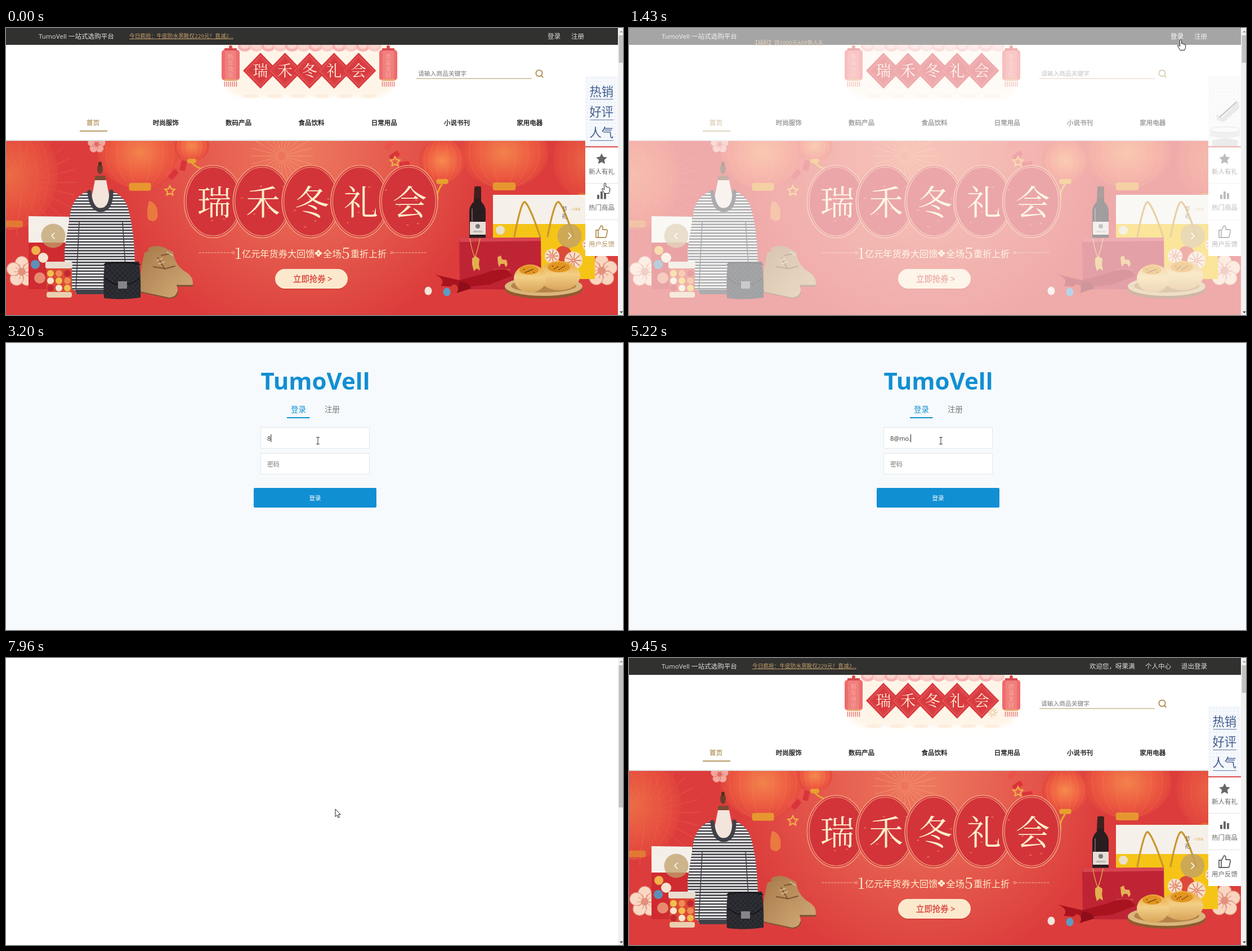
An HTML page that plays this animation: 1096x511 px, repeating every 9.69 s.

```html
<!DOCTYPE html>
<html lang="zh-CN">
<head>
<meta charset="utf-8">
<title>TumoVell</title>
<style>
html, body { margin: 0; width: 100%; height: 100%; overflow: hidden; background: #fff; }
svg { display: block; width: 1096px; height: 511px; }
text { font-family: "Open Sans", "Noto Sans CJK SC", "Noto Sans CJK", sans-serif; white-space: pre; }
.serif { font-family: "Noto Serif CJK SC", "Noto Serif", "Noto Sans CJK SC", serif; }
.mid { text-anchor: middle; }
</style>
</head>
<body>
<svg id="stage" viewBox="0 0 1096 511" xmlns="http://www.w3.org/2000/svg"></svg>
<script>
const LOOP = 9690;
const steps = [0, 250, 680, 910, 1180, 1430, 1680, 1930, 2170, 2430, 2680, 3200, 3700, 4200, 4450,
  5220, 5470, 5720, 5970, 6470, 6720, 6970, 7200, 7440, 7710, 7960, 8220, 8450, 8710, 8960, 9200, 9450];
const gold = '#b4955f';
const EVENT = [...'瑞禾冬礼会'];

// Markup helpers
const many = (n, f) => Array.from({ length: n }, (_, i) => f(i)).join('');
const text = (x, y, s, size, fill, more = '') =>
  `<text x="${x}" y="${y}" font-size="${size}" fill="${fill}" ${more}>${s}</text>`;
const mid = (x, y, s, size, fill, more = '') => text(x, y, s, size, fill, 'class="mid" ' + more);
const rect = (x, y, w, h, fill, more = '') =>
  `<rect x="${x}" y="${y}" width="${w}" height="${h}" fill="${fill}" ${more}/>`;
const oval = (x, y, rx, ry, fill, more = '') =>
  `<ellipse cx="${x}" cy="${y}" rx="${rx}" ry="${ry}" fill="${fill}" ${more}/>`;
const path = (d, fill, more = '') => `<path d="${d}" fill="${fill}" ${more}/>`;
const line = (d, color, w = 1, more = '') =>
  `<path d="${d}" fill="none" stroke="${color}" stroke-width="${w}" stroke-linecap="round" ${more}/>`;
const group = (id, inner, more = '') => `<g id="${id}" ${more}>${inner}</g>`;
const star = (x, y, r, inner) => 'M' + Array.from({ length: 10 }, (_, i) => {
  const a = i * Math.PI / 5 - Math.PI / 2, q = i % 2 ? r * inner : r;
  return (x + q * Math.cos(a)).toFixed(1) + ' ' + (y + q * Math.sin(a)).toFixed(1);
}).join('L') + 'Z';
const rays = (x, y, r0, r1, n, color, w) => many(n, i => {
  const a = i * 2 * Math.PI / n, c = Math.cos(a), s = Math.sin(a);
  return line(`M${x + r0 * c} ${y + r0 * s}L${x + r1 * c} ${y + r1 * s}`, color, w);
});
const flower = (x, y, r, fill, core) => many(5, i => {
  const a = i * 1.2566 - 1.57;
  return oval(x + r * .58 * Math.cos(a), y + r * .58 * Math.sin(a), r * .43, r * .43, fill,
    `stroke="${core}" stroke-width="${r / 22}"`);
}) + oval(x, y, r * .25, r * .25, core) + rays(x, y, r * .2, r * .5, 10, core, r / 25);

const defs = `<defs>
<radialGradient id="glow" gradientUnits="userSpaceOnUse" cx="520" cy="225" r="330">
<stop offset="0" stop-color="#ee7a60"/><stop offset="1" stop-color="#ee7a60" stop-opacity="0"/></radialGradient>
<radialGradient id="lamp"><stop offset="0" stop-color="#f68a4e"/><stop offset=".7" stop-color="#ee5b41"/>
<stop offset="1" stop-color="#e2473d"/></radialGradient>
<linearGradient id="bun" x2="0" y2="1"><stop offset="0" stop-color="#e9a53a"/><stop offset=".45" stop-color="#f3cf86"/>
<stop offset="1" stop-color="#d9a45c"/></linearGradient>
<linearGradient id="boot" x2="1" y2="1"><stop offset="0" stop-color="#a87b4b"/><stop offset="1" stop-color="#cfa673"/></linearGradient>
<pattern id="knit" width="8" height="5.2" patternUnits="userSpaceOnUse">${rect(0, 0, 8, 5.2, '#f2efee')}${rect(0, 0, 8, 2.6, '#45464d')}</pattern>
<pattern id="quilt" width="9" height="9" patternUnits="userSpaceOnUse">${rect(0, 0, 9, 9, '#26272c')}${line('M0 0L9 9M9 0L0 9', '#3d3e45', .8)}</pattern>
<pattern id="dots" x="1029" y="86" width="6.2" height="6.2" patternUnits="userSpaceOnUse">${oval(3, 3, .7, .7, '#cfd9ea')}</pattern>
<filter id="soft" x="-10%" y="-20%" width="120%" height="140%"><feGaussianBlur stdDeviation="4"/></filter>
<clipPath id="hero">${rect(0, 201, 1087, 310, '#000')}</clipPath>
<clipPath id="news">${rect(215, 9, 220, 22, '#000')}</clipPath>
</defs>`;

function logo() {
  const lantern = (x, words) => line(`M${x} -5V39`, '#e88', 1) +
    rect(x - 16, 39, 32, 54, '#ee6c6e', 'rx="5"') + rect(x - 10, 40, 20, 52, '#f07f7d', 'rx="3"') +
    rect(x - 11, 36, 22, 4, '#d9494f', 'rx="1"') + rect(x - 12, 91, 24, 3, '#e9a36c', 'rx="1"') +
    oval(x, 34, 3, 3, '#e0494f') +
    many(7, i => line(`M${x - 10.5 + i * 3.5} 96V104`, '#e8696b', 1.3)) +
    [...words].map((c, i) => mid(x, 55 + i * 11, c, 10.5, '#f6aaa0')).join('');
  const diamond = (c, i) => {
    const x = 452 + i * 43.6;
    return group('dia' + i, path(`M${x} 44L${x + 31} 76L${x} 108L${x - 31} 76Z`, '#d93a40') +
      path(`M${x} 49L${x + 26} 76L${x} 103L${x - 26} 76Z`, 'none', 'stroke="#ee8b83" stroke-width=".8"') +
      path(`M${x} 53L${x + 22} 76L${x} 99L${x - 22} 76Z`, 'none', 'stroke="#e4605f" stroke-width=".7"') +
      `<text x="${x}" y="86" font-size="27" fill="#fff2db" class="mid serif">${c}</text>`);
  };
  return rect(387, 10, 304, 112, '#fef5e8', 'rx="34" filter="url(#soft)"') +
    many(6, i => oval(435 + i * 42, 121, 14, 3.5, '#fdeedd')) +
    many(12, i => oval(424 + i * 21, 33, 12, 9, i % 2 ? '#f9c9c6' : '#f7b1b1') + oval(424 + i * 21, 31, 8, 6, '#fbd5d0')) +
    group('lamps', lantern(399, '新年快乐') + lantern(679, '恭喜发财')) +
    EVENT.map(diamond).join('') +
    group('spark', rays(646, 97, 3, 8, 10, '#e0ad68', 1));
}

function lamps() {
  const lamp = (x, y, rx, ry, a, tab) =>
    `<g opacity="${a}">` + oval(x, y, rx, ry, 'url(#lamp)') +
    [.25, .55, .8].map(k => oval(x, y, rx * k, ry, 'none', 'stroke="#f5945f" stroke-opacity=".35"')).join('') +
    rect(x - rx * .26, y + ry * .84, rx * .52, tab, '#e8a02e', 'rx="4"') + '</g>';
  const cracker = (x, y, dir) => many(7, i =>
    rect(-5, -9, 10, 18, i % 2 ? '#d9343a' : '#ea5347',
      `rx="2" transform="translate(${x + dir * i * 9} ${y - i * 8 + (i % 2) * 11}) rotate(${dir * 55 - i * 14})"`));
  return rays(30, 275, 25, 95, 26, 'rgba(246,130,100,.35)', 1) + rays(490, 228, 8, 55, 24, 'rgba(250,190,130,.45)', 1) +
    lamp(8, 262, 84, 96, .6, 12) + lamp(238, 222, 75, 64, .9, 14) + lamp(885, 222, 78, 63, .9, 14) +
    lamp(1032, 235, 60, 70, .5, 12) +
    cracker(288, 258, 1) + cracker(735, 256, -1) +
    lamp(330, 210, 31, 27, 1, 8) + lamp(775, 236, 41, 39, 1, 9) +
    line('M330 240Q342 252 352 250M774 279Q766 290 764 305', '#e6a630', 3) +
    path('M254 308Q272 312 269 338Q262 349 252 340Q249 325 254 308Z', '#ea7a40') +
    path('M759 286Q770 289 768 306Q762 314 758 306Z', '#e6a51e') +
    [[291, 290], [691, 238]].map(([x, y]) => path(star(x, y, 9, .5), 'none', 'stroke="#f2b04a" stroke-width="2.2"')).join('') +
    flower(161, 207, 16, '#f3a9a0', '#e06d63');
}

function goodsLeft() {
  return flower(28, 434, 27, '#f9d9c4', '#e2917c') +
    path('M40 335L112 336V465H40Z', '#f4efe9') + path('M40 382H112V465H40Z', '#cf2b31') +
    oval(53, 396, 8, 8, '#f0b24a') + oval(66, 409, 9, 9, '#f6e3d0') + oval(52, 421, 8, 8, '#5d90b8') + oval(60, 445, 10, 10, '#e88a70') +
    oval(167, 251, 5, 9, '#6b3d2a') + rect(164, 238, 6, 8, '#52301f', 'rx="3"') + rect(158, 263, 19, 10, '#7d4a32', 'rx="3"') +
    path('M158 271H178L182 292Q190 318 168 324Q146 318 154 292Z', '#f3e4dc') +
    path('M148 290Q122 297 115 325L104 395L105 455Q107 466 122 466L125 473H212L216 440L229 424Q228 360 217 322Q211 299 186 289Q186 324 168 324Q152 322 148 290Z', 'url(#knit)') +
    line('M148 292Q151 324 168 324Q187 324 187 291', '#404148', 7) +
    line('M130 345L124 470M207 345L213 440', '#3c3d44', 1.5) + rect(125, 466, 50, 8, '#404148') +
    path('M252 392Q266 385 279 390L297 399Q300 424 322 436Q335 446 331 459H296Q270 445 260 428Z', 'url(#boot)') +
    line('M296 459H331', '#7b5532', 3) +
    path('M246 400Q262 392 276 403L281 428Q302 446 305 466Q305 479 290 481L238 470Q235 446 246 400Z', 'url(#boot)') +
    line('M239 470L290 481Q303 480 305 470M270 409L282 429M276 405L290 402M262 425L280 428M281 429L300 424', '#7b5532', 2) +
    line('M268 414L278 410M271 420L282 416M286 399L296 405', '#f0dab8', 1.2) +
    path('M176 416H236Q240 440 239 480Q206 485 174 481Q172 440 176 416Z', 'url(#quilt)') +
    line('M174 421Q206 414 238 421M176 446Q206 470 237 446', '#0f1013', 1.5) + rect(199, 451, 16, 13, '#85858a') +
    rect(72, 424, 45, 56, '#dc4a35', 'rx="7"') + rect(70, 416, 48, 12, '#e9ddd0', 'rx="3"') + rect(72, 470, 45, 10, '#ead0b0', 'rx="4"') +
    many(9, i => oval(79 + i % 3 * 15, 437 + (i / 3 | 0) * 13, 6, 6, ['#f0c04e', '#f8e5cf', '#c22832', '#f08a54'][i * 3 % 4]));
}

function goodsRight() {
  const blossom = (x, y, r) => oval(x, y, r, r, '#f4dfc8') + rays(x, y, 2, r - 2, 9, '#df6a50', 1.3);
  return flower(1058, 432, 28, '#f9d6c0', '#e2917c') +
    path('M865 297H1046V447H865Z', '#f5f1ea') + path('M865 349H1046V447H865Z', '#f5c417') +
    line('M903 371Q916 305 922 310Q931 318 949 372M962 371Q975 305 982 310Q991 318 1008 372', '#c9962f', 3.2) +
    oval(990, 402, 14, 14, '#dd4a3a') + blossom(970, 406, 13) + blossom(1008, 414, 16) + oval(993, 425, 9, 9, '#6a9ab0') +
    blossom(1036, 386, 12) + oval(878, 360, 8, 8, '#e8e1c8') +
    text(987, 326, '节', 10, '#4a3a32', 'class="serif"') + text(987, 339, '礼', 10, '#4a3a32', 'class="serif"') +
    text(1002, 324, '八方新禧', 4.5, '#d9a24a') +
    path('M832 284Q838 279 844 284V309Q852 317 852 326V377H823V326Q823 317 831 309Z', '#2a1d20') +
    rect(832, 282, 12, 22, '#40201f', 'rx="2"') + line('M828 322V344', '#6f595b', 2) + rect(824, 345, 28, 23, '#e5ddd6') +
    oval(838, 353, 4, 4, '#777') + text(830, 364, 'VINO ROSSO', 2.8, '#555') +
    path('M805 374L950 373L951 466L806 465Z', '#bf2435') + path('M805 374L950 373V379L806 381Z', '#d84550') +
    line('M824 375Q827 395 833 409Q838 395 842 375', '#ddb04f', 1.3) +
    path('M828 410L834 406L841 411L840 421L842 432L836 428L831 433L828 421Z', '#e3b14e') +
    path('M873 408L879 405L881 412L889 413L891 421L888 426L885 420L879 420L876 426L874 419Z', '#e5ae55') +
    mid(881, 432, 'GOOD DAY GIFT', 4, '#e5ae55') +
    path('M762 439L805 449L850 437Q872 427 890 431L900 441L858 457L806 462L772 459Q782 448 762 439Z', '#a9131f') +
    path('M806 451Q824 453 826 464L800 472Z', '#8d0e19') +
    oval(750, 468, 6.5, 7.5, '#f2e6d8') + oval(783, 470, 6.5, 7.5, '#5b9cc4') + oval(796, 465, 7, 8.5, '#d63a35') +
    oval(955, 466, 69, 16, '#8f5b2f') + oval(955, 460, 69, 17, '#d9b67c') + oval(955, 459, 58, 12, '#b58448') +
    oval(983, 441, 37, 26, 'url(#bun)') + oval(931, 446, 29, 25, 'url(#bun)') +
    oval(982, 426, 20, 9, '#e2941f') + oval(929, 431, 17, 8, '#e2941f') +
    many(8, i => oval(920 + i * 2.6, 430 + i * 5 % 6, .9, .9, '#3a2412') + oval(971 + i * 3, 424 + i * 5 % 7, .9, .9, '#3a2412'));
}

function banner() {
  const medal = (c, i) => {
    const x = 368 + i * 86.8;
    return oval(x, 309, 51.5, 64.5, '#da3c3d', 'stroke="#f0a07f" stroke-width="1.6"') +
      oval(x, 309, 48, 61, '#d2343a', 'stroke="#f0a07f" stroke-width="1.2"') +
      many(5, k => rect(x - 34 + k * 15, 268 + (k * 37 + i * 23) % 84, 4, 2, '#ee6a45', `transform="rotate(${k * 9 - 18} ${x} 309)"`));
  };
  const arrow = (x, d) => oval(x, 370, 21.5, 21.5, '#c0a06b', 'opacity=".75"') +
    line(`M${x + d * 2} 365L${x - d * 3} 370L${x + d * 2} 375`, '#fff', 1.5);
  const cream = '#fdeccb';
  return `<g clip-path="url(#hero)">` + rect(0, 201, 1087, 310, '#dc3d3c') + rect(0, 201, 1087, 310, 'url(#glow)') +
    lamps() + goodsLeft() + goodsRight() + EVENT.map(medal).join('') +
    EVENT.map((c, i) => `<text x="${370 + i * 86.8}" y="333" font-size="61" fill="${cream}" class="mid serif">${c}</text>`).join('') +
    line('M343 400H401M688 400H747', '#f5b9a0', 1, 'stroke-dasharray="3 2.5"') +
    oval(404, 400, 2, 2, 'none', 'stroke="#f5b9a0"') + oval(685, 400, 2, 2, 'none', 'stroke="#f5b9a0"') +
    text(406, 411, '1', 27, cream, 'class="serif"') + text(419, 408, '亿元年货券大回馈', 16.2, cream, 'font-weight="500"') +
    [[0, -3.5], [0, 3.5], [-3.5, 0], [3.5, 0]].map(([a, b]) => oval(555 + a, 401 + b, 2.6, 2.6, cream)).join('') +
    text(563, 408, '全场', 16.4, cream, 'font-weight="500"') + text(596, 411, '5', 27, cream, 'class="serif"') +
    text(612, 408, '重折上折', 16, cream, 'font-weight="500"') +
    rect(478, 431, 129, 35, '#b92c30', 'rx="17.5" opacity=".35"') + rect(478, 429, 129, 35, '#fce9cd', 'rx="17.5"') +
    text(510, 452, '立即抢券 &gt;', 14.4, '#d8413c', 'stroke="#d8413c" stroke-width=".3"') +
    arrow(84, 1) + arrow(1001, -1) + '</g>';
}

function side() {
  const thumb = 'M1048 360H1052V373H1048ZM1052 361L1057 352Q1061 352 1060 359H1067Q1069 360 1068 363L1066 372Q1065 373 1063 373H1052';
  return rect(1029, 86, 58, 320, '#fff') + rect(1029, 86, 58, 125, '#f5f8fc') + rect(1029, 86, 58, 125, 'url(#dots)') +
    ['热销', '好评', '人气'].map((s, i) => group('tag' + i,
      text(1036.5, 120.5 + i * 36.5, s, 21.3, '#3f5d8d') + rect(1037.5, 126.5 + i * 36.7, 41.5, 1, '#5f7aa3'))).join('') +
    group('gift', rect(1029, 86, 58, 125, '#f6f6f6') + rect(1029, 86, 58, 125, 'url(#dots)') +
      path('M1033 181V192Q1058 200 1085 192V181Z', '#dedede') + oval(1059, 181, 26, 5, '#f7f7f7', 'stroke="#ccc"') +
      path('M1036 211V200Q1058 193 1081 200V211Z', '#d2d2d2') +
      path('M1043 154L1073 127L1083 131L1084 143L1056 168L1045 164Z', '#d0d0d0') + path('M1043 154L1073 127L1083 131L1054 159Z', '#f4f4f4') +
      line('M1050 158L1079 132', '#888', 2.5)) +
    rect(1029, 210.5, 58, 2, '#d9423f') + rect(1029, 276, 58, 1, '#e4e4e4') + rect(1029, 341, 58, 1, '#e4e4e4') +
    path(star(1058, 233.5, 9.5, .48), '#666', 'stroke="#666" stroke-linejoin="round"') +
    rect(1050, 297, 4, 7.5, '#666') + rect(1056, 291, 4, 13.5, '#666') + rect(1062, 294, 4, 10.5, '#666') +
    mid(1058, 259.5, '新人有礼', 11.5, '#666') + mid(1058, 324, '热门商品', 11.5, '#666') +
    group('feed', path(thumb, 'none', 'stroke="currentColor" stroke-width="1.8" stroke-linejoin="round"') +
      mid(1058, 388.5, '用户反馈', 11.5, 'currentColor'));
}

function home() {
  const nav = ['首页', '时尚服饰', '数码产品', '食品饮料', '日常用品', '小说书刊', '家用电器'];
  const pale = '#dedede';
  return rect(0, 0, 1087, 511, '#fff') + logo() + rect(0, 0, 1087, 30, '#313130') +
    text(58, 18.5, 'TumoVell 一站式选购平台', 11.6, pale) +
    '<g clip-path="url(#news)">' +
    text(219, 18, '今日疯抢：牛皮防水男靴仅229元！直减2...', 9.7, '#c6a06c', 'id="news0" text-decoration="underline"') +
    text(219, 18, '【福利】领1000元APP新人礼', 9.7, '#c6a06c', 'id="news1" text-decoration="underline"') + '</g>' +
    group('guest', text(962, 18.5, '登录', 11.6, pale, 'id="enter"') + text(1004, 18.5, '注册', 11.6, pale)) +
    group('member', text(818, 18.5, '欢迎您，呀果满', 11.5, pale) + text(917, 18.5, '个人中心', 11.5, pale) + text(981, 18.5, '退出登录', 11.5, pale)) +
    text(732, 84.5, '请输入商品关键字', 10.75, '#757575') + rect(729, 89.5, 205, 1, gold) +
    oval(947, 80.5, 5.6, 5.6, 'none', `stroke="${gold}" stroke-width="2"`) + line('M951 85L953.5 87.5', gold, 2.2) +
    nav.map((s, i) => mid(154.5 + i * 129.3, 173, s, 11.5, i ? '#111' : gold, `stroke="${i ? '#111' : gold}" stroke-width=".3"`)).join('') +
    rect(131, 182.5, 49, 2, gold) + rect(0, 199, 1087, 2, '#dfe4e8') + banner() + side();
}

function login() {
  const blue = '#118fd3';
  const box = y => rect(452.5, y + .5, 193, 37, '#fff', 'stroke="#e1e7eb"');
  return rect(0, 0, 1096, 511, '#f6fafc') + mid(549.5, 83, 'TumoVell', 42, blue, 'font-weight="700"') +
    text(506, 123, '登录', 13.4, blue) + text(566, 123, '注册', 13.4, '#777') + rect(499, 132, 40.5, 2, blue) +
    box(150) + box(196) + text(464, 173.5, '', 11, '#333', 'id="user"') + text(464, 219.5, '', 10.8, '#333', 'id="pass"') +
    rect(464, 162.5, 1, 14, '#222', 'id="caret"') +
    rect(440, 258, 218, 35, blue, 'rx="2" id="submit"') + mid(549, 279.5, '登录', 10.6, '#fff');
}

const ink = 'stroke="#222" stroke-linejoin="round"';
const pointers = group('arrow', path('M0 0V13.5L3 10.7L5.2 15.5L7.3 14.5L5.1 9.8H9.3Z', '#fff', ink)) +
  group('hand', path('M-1.5 1Q0 -1 1.5 1V7L3 6.3L4.5 8L6 7.3L7.3 9L8.7 9V13L7 18.5H-1L-5.5 11Q-5.5 9 -3.5 10L-1.5 12Z', '#fff', ink)) +
  group('beam', line('M-2.5 -6H2.5M0 -6V6M-2.5 6H2.5', '#333', 1));

const stage = document.getElementById('stage');
stage.innerHTML = defs + rect(0, 0, 1096, 511, '#fff') + group('home', home()) +
  group('bar', rect(1087, 0, 9, 511, '#f1f1f1') + rect(1088.5, 13, 7.5, 49, '#c1c1c1', 'id="thumb"') +
    path('M1090 8L1093 4.5L1096 8Z', '#a3a3a3') + path('M1090 504.5L1093 508L1096 504.5Z', '#444')) +
  group('login', login()) + group('pointer', pointers);

const $ = id => document.getElementById(id);
const show = (id, on) => $(id).setAttribute('visibility', on ? 'inherit' : 'hidden');
const set = (id, name, v) => $(id).setAttribute(name, v);

// Linear interpolation over [time, value] rows
function track(t, rows) {
  const n = rows.findIndex(r => r[0] > t);
  if (n === 0) return rows[0][1];
  if (n < 0) return rows[rows.length - 1][1];
  const [a, b] = [rows[n - 1], rows[n]];
  return a[1] + (b[1] - a[1]) * (t - a[0]) / (b[0] - a[0]);
}
const latest = (t, rows) => rows.filter(r => r[0] <= t).pop();

const moves = [[0, 1064, 276, 'hand'], [250, 1062, 190, 'arrow'], [680, 1005, 62, 'arrow'], [910, 982, 22, 'hand'],
  [1180, 980, 21, 'hand'], [1930, 980, 21, 'arrow'], [2170, 570, 184, 'beam'], [2430, 554, 174, 'beam'],
  [6970, 585, 268, 'hand'], [7710, 585, 269, 'arrow'], [8220, 589, 270, 'arrow'], [8960, 850, 300, 'arrow'],
  [9200, 1068, 305, 'hand'], [9450, 1068, 305, '']];
const typed = [[0, 0], [3200, 1], [4200, 2], [4450, 4], [5220, 5], [5470, 7], [5720, 9]];
const blink = [[0, 0], [2430, 1], [3700, 0], [4200, 1], [6470, 0], [6720, 1], [6970, 0]];

function draw(t) {
  const back = t >= 8220;
  set('home', 'opacity', t < 4000 ? track(t, [[1180, 1], [1620, 0]]) : track(t, [[7960, 0], [8234, 1]]));
  set('login', 'opacity', track(t, [[1680, 0], [2170, 1], [7440, 1], [7900, 0]]));
  show('bar', t < 1930 || t >= 7960);
  set('thumb', 'height', t >= 7960 && !back ? 253 : 49);

  const y = back ? 41 : track(t, [[1180, 41], [1430, 29.5], [1680, 18]]);
  set('news0', 'y', y - 23);
  set('news1', 'y', y);
  show('guest', !back);
  show('member', back);
  set('enter', 'fill', t >= 910 && t < 1930 ? '#fff' : '#dedede');
  $('feed').style.color = t < 250 ? gold : '#666';

  set('lamps', 'transform', `translate(0 ${back ? track(t, [[8220, -32], [8710, 0]]) : 0})`);
  EVENT.forEach((c, i) => {
    const s = back ? track(t, [[8220 + i * 90, 0], [8500 + i * 90, 1]]) : 1;
    const x = 452 + i * 43.6;
    set('dia' + i, 'transform', `translate(${x} 76) scale(${s}) translate(${-x} -76)`);
  });
  show('spark', t >= 9450);
  for (let i = 0; i < 3; i++) {
    const at = 8220 + i * 240;
    show('tag' + i, !back || t >= at);
    set('tag' + i, 'transform', `translate(${back ? track(t, [[at, 6], [at + 230, 0]]) : 0} 0)`);
    set('tag' + i, 'opacity', back ? track(t, [[at, .8], [at + 230, 1]]) : 1);
  }
  show('gift', t >= 680 && t < 4000);

  const count = latest(t, typed)[1];
  $('user').textContent = count ? '8@mo.test'.slice(0, count) : '邮箱';
  set('user', 'fill', count ? '#333' : '#757575');
  const dots = t >= 6970 ? 6 : t >= 6720 ? 3 : 0;
  $('pass').textContent = dots ? '•'.repeat(dots) : '密码';
  set('pass', 'fill', dots ? '#333' : '#757575');
  const low = t >= 5970, filled = low ? dots : count;
  set('caret', 'x', 464 + (filled ? $(low ? 'pass' : 'user').getComputedTextLength() : 0));
  set('caret', 'y', low ? 208.5 : 162.5);
  show('caret', latest(t, blink)[1]);
  set('submit', 'fill', t >= 6970 ? '#37a2de' : '#118fd3');

  const [, px, py, kind] = latest(t, moves);
  set('pointer', 'transform', `translate(${px} ${py})`);
  ['arrow', 'hand', 'beam'].forEach(k => show(k, k === kind));
}

const start = performance.now();
let last = -1;
function tick() {
  const now = (performance.now() - start) % LOOP;
  const t = steps.filter(s => s <= now).pop();
  if (t !== last) draw(last = t);
  requestAnimationFrame(tick);
}
tick();
</script>
</body>
</html>
```
